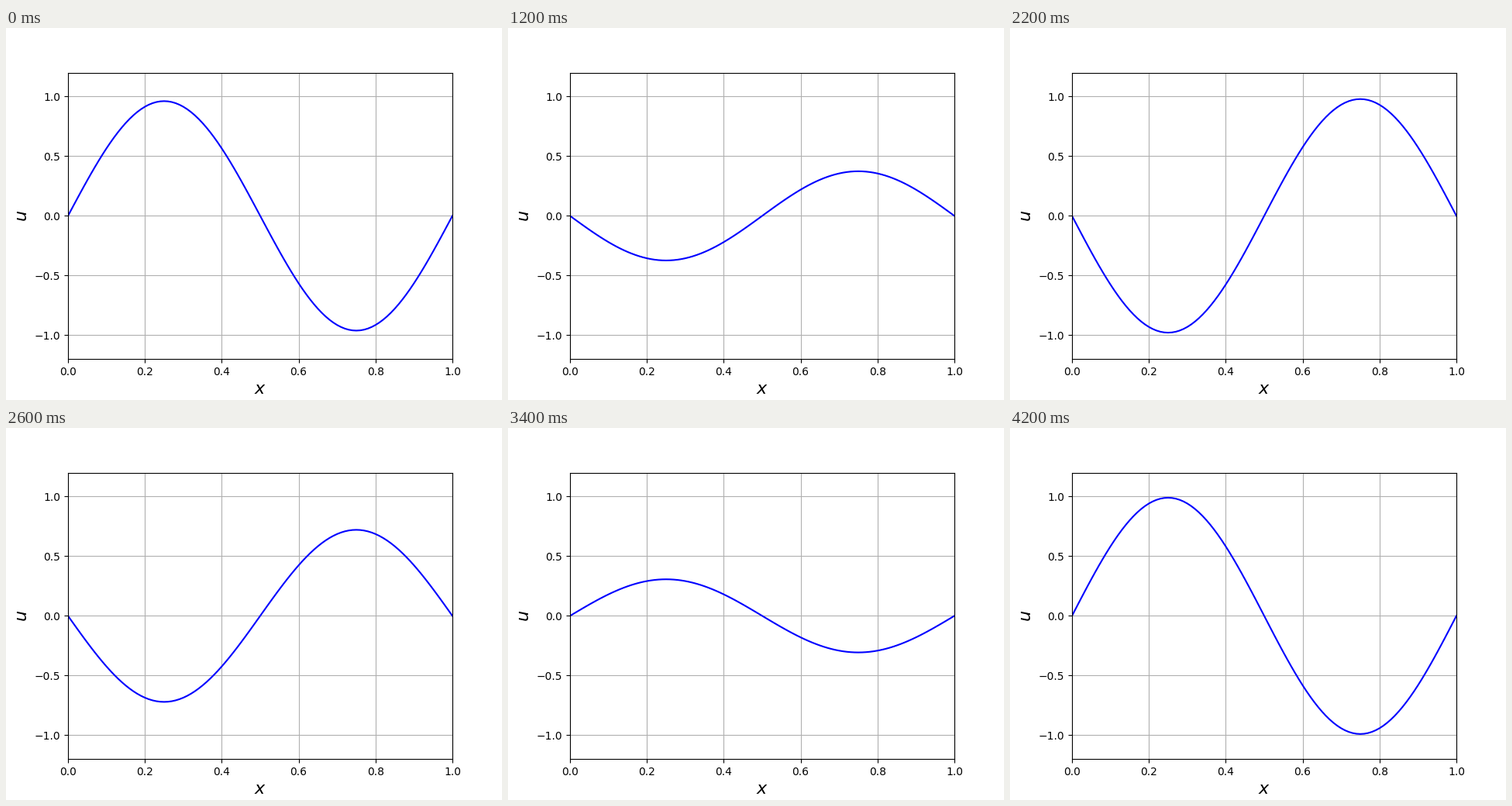
Write a matplotlib script that moves like this. It is 640 by 480 pixels and loops after 4.4 s.

```python
import numpy as np
import matplotlib.pyplot as plt
from matplotlib.animation import FuncAnimation

FRAMES = 22
INTERVAL = 200        # ms
PHASE_STEP = 0.2791   # radians of oscillation per frame

x = np.linspace(0, 1, 101)
mode = np.sin(2 * np.pi * x)


def wave(frame):
    """Standing wave, already one step into its swing at the first frame."""
    return mode * np.cos(PHASE_STEP * (frame + 1))


fig, ax = plt.subplots(figsize=(6.4, 4.8), dpi=100)
ax.set_xlim(0, 1)
ax.set_ylim(-1.2, 1.2)
ax.set_xlabel("$x$", fontsize=16)
ax.set_ylabel("$u$", fontsize=16)
ax.grid(True)
line, = ax.plot(x, wave(0), color="#0000ff", linewidth=1.5)


def update(frame):
    line.set_ydata(wave(frame))
    return line,


anim = FuncAnimation(fig, update, frames=FRAMES, interval=INTERVAL,
                     repeat=True, repeat_delay=0)
plt.show()
```
